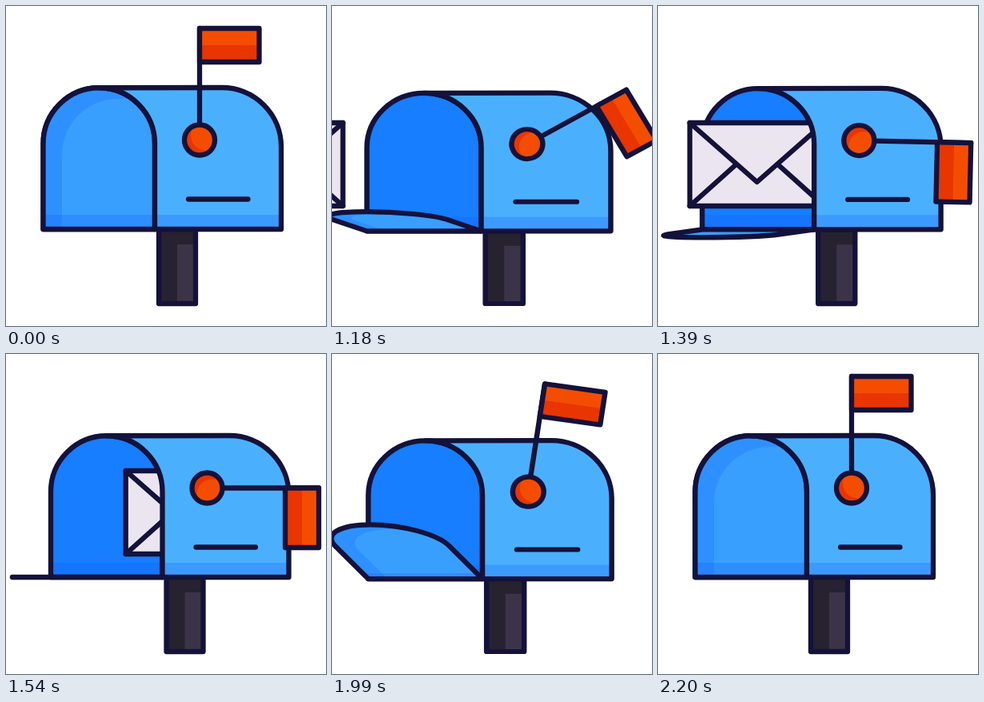
An HTML page with a canvas that plays this animation: 400 by 400 pixels, repeating every 2230 ms.

```html
<!DOCTYPE html>
<html lang="en">
<head>
<meta charset="utf-8">
<title>Mailbox</title>
<style>
  html, body { margin: 0; width: 100%; height: 100%; overflow: hidden; background: #fff; }
  canvas { display: block; width: 100%; height: 100%; }
</style>
</head>
<body>
<canvas id="stage" width="400" height="400"></canvas>
<script>
const ctx = document.getElementById('stage').getContext('2d');
const LOOP = 2230, START = 1030, STEP = 30;
const INK = '#14123a', SHADE = 'rgba(16,90,255,.25)';
const RED = '#f54d00', DARK_RED = '#e93500';
const BASE = 279, LEFT = 46.5, FRONT = 186, RIGHT = 344, TOP = 102, GROUND = 372;

const smooth = p => p * p * (3 - 2 * p);
const squared = p => p * p;

// Each key is [time, value, easing towards it].
const tracks = {
  flag: [[1000, 0], [1080, -13], [1240, 94], [1480, 90], [1840, 90], [2050, -11.8], [2200, 0]],
  door: [[1050, 0], [1230, 101], [1480, 90], [1840, 90], [2136, 0, squared]],
  squash: [[1000, 0], [1120, .027], [1460, 0], [1840, 0], [1870, .004], [2060, .031], [2200, 0]],
  shift: [[1110, 0], [1420, 9.5], [1860, 9.5], [2060, 0]],
  letter: [[1150, -185], [1660, 205, p => 1 - (1 - p) ** 1.35]]
};

function valueAt(keys, t) {
  if (t <= keys[0][0]) return keys[0][1];
  for (let i = 1; i < keys.length; i++) {
    const [t0, v0] = keys[i - 1], [t1, v1, ease = smooth] = keys[i];
    if (t < t1) return v0 + (v1 - v0) * ease((t - t0) / (t1 - t0));
  }
  return keys[keys.length - 1][1];
}

function polyline(points, close) {
  const path = new Path2D();
  points.forEach(([x, y]) => path.lineTo(x, y));
  if (close) path.closePath();
  return path;
}

function box(x, y, w, h) {
  const path = new Path2D();
  path.rect(x, y, w, h);
  return path;
}

function fill(path, color) {
  ctx.fillStyle = color;
  ctx.fill(path);
}

function isolated(draw) {
  ctx.save();
  draw();
  ctx.restore();
}

const shadeBase = () => fill(box(0, 261, 400, BASE - 261), SHADE);

const opening = new Path2D();
opening.moveTo(LEFT, BASE);
opening.arc((LEFT + FRONT) / 2, 172, (FRONT - LEFT) / 2, Math.PI, 0);
opening.lineTo(FRONT, BASE);
opening.closePath();

const side = new Path2D();
side.moveTo(FRONT, BASE);
side.arc((LEFT + FRONT) / 2, 172, (FRONT - LEFT) / 2, 0, -Math.PI / 2, true);
side.arc(270, TOP + 74, 74, -Math.PI / 2, 0);
side.lineTo(RIGHT, BASE);
side.closePath();

const doorGlow = new Path2D();
doorGlow.moveTo(70, BASE);
doorGlow.arc(140, 186, 70, Math.PI, Math.PI * 1.5);
doorGlow.lineTo(200, 116);
doorGlow.lineTo(200, BASE);

function panel(path, color) {
  isolated(() => {
    ctx.clip(path);
    fill(path, color);
    shadeBase();
  });
  ctx.stroke(path);
}

function drawPost() {
  const post = box(191, BASE, 46, GROUND - BASE);
  fill(post, '#27222f');
  fill(box(214, 298, 23, GROUND - 298), '#3b3449');
  ctx.stroke(post);
}

function drawDoor(degrees) {
  const angle = degrees * Math.PI / 180;
  const lean = -.4 * Math.max(0, Math.sin(angle)) ** .7;
  const height = Math.cos(angle);
  const fold = new DOMMatrix([1, 0, -lean, height, lean * BASE, BASE * (1 - height)]);
  const outline = new Path2D();
  outline.addPath(opening, fold);
  if (Math.abs(height) > .002) {
    isolated(() => {
      ctx.clip(outline);
      ctx.transform(fold.a, fold.b, fold.c, fold.d, fold.e, fold.f);
      fill(opening, '#2e90ff');
      fill(doorGlow, '#389fff');
      shadeBase();
    });
  }
  ctx.stroke(outline);
}

function drawLetter(x) {
  ctx.translate(x, 146);
  const sheet = box(0, 0, 168, 104);
  fill(sheet, '#ebe5f0');
  ctx.stroke(polyline([[0, 104], [58, 52]]));
  ctx.stroke(polyline([[168, 104], [110, 52]]));
  ctx.stroke(polyline([[0, 0], [84, 74], [168, 0]]));
  ctx.stroke(sheet);
}

function drawFlag(degrees) {
  ctx.translate(242, 167.5);
  ctx.rotate(degrees * Math.PI / 180);
  ctx.stroke(polyline([[0, -19], [0, -139.5]]));
  const cloth = box(0, -139.5, 74.5, 42);
  fill(cloth, RED);
  fill(box(0, -118.5, 74.5, 21), DARK_RED);
  ctx.stroke(cloth);

  const knob = new Path2D(), shine = new Path2D();
  knob.arc(0, 0, 19, 0, Math.PI * 2);
  shine.arc(8, -6, 19, 0, Math.PI * 2);
  isolated(() => {
    ctx.clip(knob);
    fill(knob, DARK_RED);
    fill(shine, RED);
  });
  ctx.stroke(knob);
}

function render(t) {
  const pose = {};
  for (const name in tracks) pose[name] = valueAt(tracks[name], t);
  const { flag, door, squash, shift, letter } = pose;

  ctx.fillStyle = '#fff';
  ctx.fillRect(0, 0, 400, 400);
  ctx.strokeStyle = INK;
  ctx.lineWidth = 6.3;
  ctx.lineCap = ctx.lineJoin = 'round';

  const inBody = draw => isolated(() => {
    ctx.translate(214 + shift, GROUND);
    ctx.scale(1 + squash, 1 - squash);
    ctx.translate(-214, -GROUND);
    draw();
  });

  inBody(() => {
    drawPost();
    panel(opening, '#167eff');
    drawDoor(door);
  });
  if (letter > -180 && letter < FRONT + shift) {
    isolated(() => {
      ctx.clip(box(0, 0, FRONT + shift, 400));
      drawLetter(letter);
    });
  }
  inBody(() => {
    panel(side, '#4ab0fe');
    ctx.stroke(polyline([[228, 241.5], [302.5, 241.5]]));
    drawFlag(flag);
  });
}

function tick() {
  const t = performance.now() % LOOP;
  render(START + Math.floor((t - START) / STEP) * STEP);
  requestAnimationFrame(tick);
}
tick();
</script>
</body>
</html>
```
